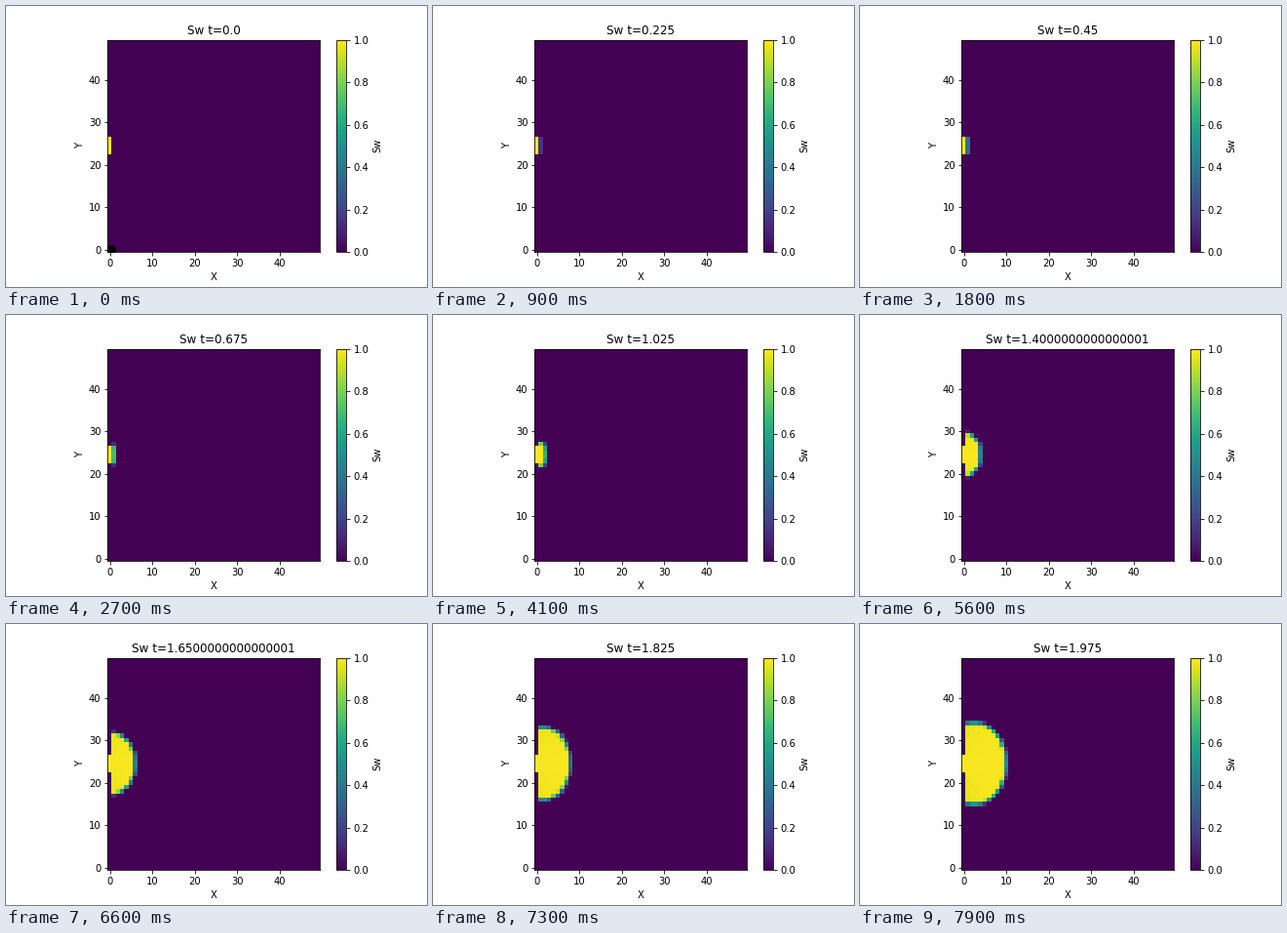
Write a matplotlib script that moves like this. It is 432 px wide and 288 px high and loops after 8000 ms.

```python
import numpy as np
import matplotlib.pyplot as plt
from matplotlib.animation import FuncAnimation

N = 50
FRAMES = 80
DT = 0.005
STEPS = 5            # time steps per frame
MID = 24.5           # row in the middle of the inlet
INLET = slice(23, 27)
BLUR = 1.15          # width of the front in cells

X, Y = np.meshgrid(np.arange(N), np.arange(N))
OFF = np.abs(Y - MID)


def saturation(t):
    tip = 0.42 * np.exp(1.605 * t)                    # front along the middle row
    top = 2 + 10 / (1 + np.exp(-3.4 * (t - 1.64)))    # half height of the front
    center = 0.025 * tip**2
    flat = 3 / top                                    # straight part left by the inlet
    a, b = tip - center, top - flat

    # approximate distance to the edge of the ellipse
    dx, dy = X - center, np.maximum(OFF - flat, 0)
    g = np.hypot(dx / a, dy / b)
    slope = np.hypot(dx / a**2, dy / b**2)
    dist = (1 - g) * g / np.maximum(slope, 1e-9)
    dist[g < 0.3] = BLUR

    s = np.clip(0.5 + dist / BLUR, 0, 1)
    s *= 0.99 - 0.04 * np.exp(-X / 3) * np.minimum(OFF / 10, 1)
    s[:, 0] = 0
    s[INLET, 0] = 1
    return s


fig, ax = plt.subplots(figsize=(6, 4), dpi=72)
fig.subplots_adjust(bottom=0.125)
image = ax.imshow(saturation(0), origin="lower", cmap="viridis", vmin=0, vmax=1)
fig.colorbar(image, ax=ax, label="Sw")
dot = ax.scatter([0], [0], s=100, c="black")
ax.set(xlabel="X", ylabel="Y", xlim=(-0.5, N - 0.5), ylim=(-0.5, N - 0.5))
title = ax.set_title("Sw t=0.0")


def update(i):
    t = i * STEPS * DT
    image.set_data(saturation(t))
    dot.set_visible(i == 0)
    title.set_text(f"Sw t={t}")
    return image, dot, title


anim = FuncAnimation(fig, update, frames=FRAMES, interval=100,
                     repeat=True, repeat_delay=0, blit=False)
plt.show()
```
